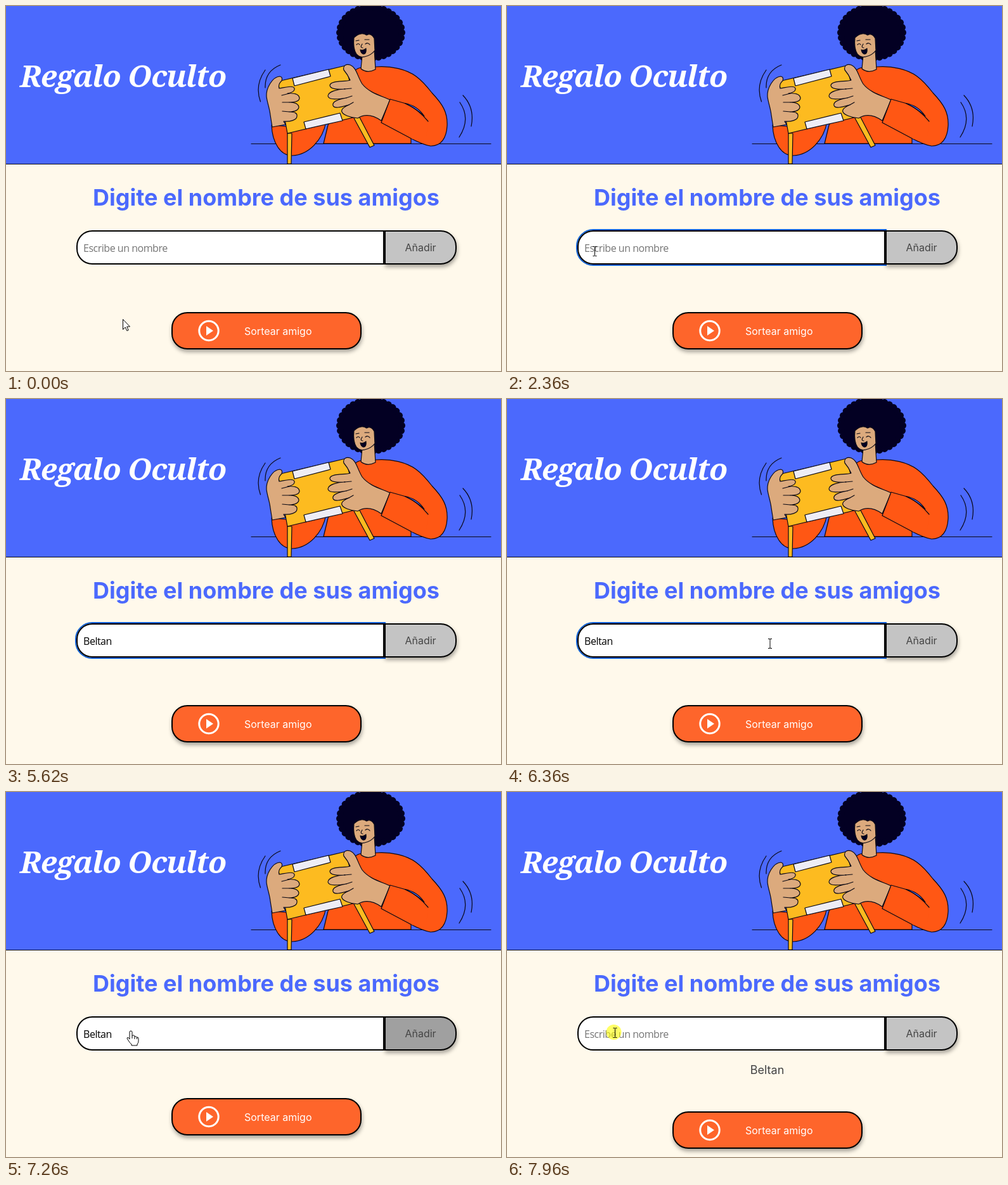
Recreate the animation shown at these times as an HTML page. Size 781 by 576 pixels, loop 8 s.

```html
<!DOCTYPE html>
<html lang="es">
<head>
<meta charset="utf-8">
<title>Sorteo</title>
<style>
  html, body { margin: 0; width: 100%; height: 100%; overflow: hidden; background: #fff9eb; }
  svg { display: block; }
  .title { font: italic 900 48px "Noto Serif", serif; letter-spacing: -.025em; fill: #fff; }
  .head { font: 700 36px Inter, sans-serif; fill: #4b69fd; }
  .ui { font: 16px Inter, sans-serif; fill: #444; }
  .item { font: 18px Inter, sans-serif; fill: #444; }
  .field { font: 16px "Open Sans", sans-serif; letter-spacing: -.03em; }
  .mid { text-anchor: middle; }
  .art { stroke: #0a0814; stroke-width: 1.2; stroke-linejoin: round; stroke-linecap: round; }
  .skin { fill: #dcaa7d; }
  .shirt { fill: #ff5714; }
  .box { fill: #fdbb20; }
  .label { fill: #eeedf5; }
  .line { fill: none; }
  .drop { filter: drop-shadow(1px 4px 3px rgba(0, 0, 0, .35)); }
  .edge { stroke: #000; stroke-width: 2; }
</style>
</head>
<body>
<svg width="781" height="576" viewBox="0 0 781 576">
  <rect width="781" height="249" fill="#4b69fd"/>
  <rect y="249" width="781" height="1" fill="#0a0a14"/>
  <text class="title" x="22" y="128">Regalo Oculto</text>

  <g class="art">
    <path class="line" d="M387 217.5H765"/>
    <path class="line" d="M409 101Q392 125 401.500 151M433 93Q408 103 409 129M716 152Q734 178 715 207M721 141Q740 161 734 190"/>

    <!-- torso and raised arm -->
    <path class="shirt" d="M501 217L508 188L548 104Q555 97 562 97L583 96C608 94 632 100 647 111C658 119 665 128 672 137C689 155 697 168 696 189C695 208 687 221 670 221Q658 219 639 209V217Z"/>
    <path class="shirt" d="M419 188C420 215 433 237 452 236C477 235 500 212 505 182L444 190Z"/>

    <!-- head -->
    <g fill="#030023" stroke="#030023">
      <ellipse cx="575.500" cy="42" rx="49" ry="40"/>
      <ellipse cx="575.500" cy="42" rx="49" ry="40" fill="none" stroke-width="11" pathLength="34" stroke-dasharray="0 1"/>
    </g>
    <path class="skin" d="M562 78L560 99Q570 107 583 100L581 68Z"/>
    <path class="skin" d="M549 50C548 59 549 70 553 76Q558 82 566 80Q576 78 582 70L581 51Q576 42 569 46Q560 40 549 50Z"/>
    <path class="line" d="M553 61Q556 58 558 61M567 60Q571 57 574 61M562 60Q558 66 563 66M552 55L557 54M566 53L573 53"/>
    <path fill="#030023" d="M559 69Q564 71 568 67Q569 75 564 76Q560 75 559 69Z"/>

    <!-- parcel -->
    <path class="box" d="M444 201H451L450 249H444Z"/>
    <path class="box" d="M549 177L557 174L581 220L574 223Z"/>
    <path class="box" d="M429 119L536 94L556 174L444 201Z"/>
    <path class="label" d="M452 114L509 100L512 111L455 126Z"/>
    <path class="label" d="M470 183L527 169L531 181L473 194Z"/>

    <!-- hands -->
    <path class="skin" d="M432 111C420 112 410 130 411 143C412 152 416 162 417 172L420 191L441 187L438 182C448 183 459 180 459 174C460 169 455 167 447 167C456 167 462 164 462 159C461 154 455 152 447 152C456 152 463 150 463 145C462 139 455 137 444 138C451 137 456 134 455 130C453 125 443 128 431 130Q429 123 435 118Q437 112 432 111Z"/>
    <path class="line" d="M447 138L435 141M447 152H436M447 167L436 166"/>
    <path class="skin" d="M533 101C531 94 537 91 543 93C553 97 554 110 562 123C573 137 590 141 606 148L592 181C582 174 568 169 555 177C543 176 532 172 530 167C528 163 534 159 541 156C530 159 518 163 516 157C514 150 527 147 537 145C525 147 509 149 508 142C508 135 524 131 535 131C522 132 511 131 511 125C513 117 535 120 543 117Q539 108 533 101Z"/>
    <path class="line" d="M534 131L545 130M537 145L546 142M541 156L548 152"/>

    <!-- forearm -->
    <path class="shirt" stroke="none" d="M606 147L631 154Q650 163 666 182L662 216L639 209L592 184Z"/>
    <path fill="#4b69fd" d="M629 153.500Q649 157 660 174Q648 162 629 153.500Z"/>
    <path class="line" d="M666 182Q650 163 631 154L606 147L592 184L639 209"/>
  </g>

  <text class="head mid" x="410.500" y="315">Digite el nombre de sus amigos</text>

  <path id="ring" fill="none" stroke="#0b5ed7" stroke-width="2" d="M598 353H136A26 26 0 0 0 110 379V383A26 26 0 0 0 136 409H598Z"/>
  <path class="edge" fill="#fff" d="M597 355H136A24 24 0 0 0 112 379V383A24 24 0 0 0 136 407H597Z"/>
  <g class="drop"><path id="add" class="edge" d="M598 355H686A24 24 0 0 1 710 379V383A24 24 0 0 1 686 407H598Z"/></g>
  <path d="M597 354V408" stroke="#000" stroke-width="4"/>
  <text class="ui mid" x="654" y="387">Añadir</text>
  <text id="field" class="field" x="122" y="388"></text>
  <rect id="caret" y="372" width="1" height="19"/>
  <text id="item" class="item mid" x="410.500" y="445">Beltan</text>

  <g id="draw">
    <rect class="edge drop" x="262" y="484" width="298" height="57" rx="24" fill="#fe652b"/>
    <circle cx="320" cy="512.500" r="15.200" fill="none" stroke="#fff" stroke-width="3"/>
    <path fill="#fff" d="M316 505L327 512.500L316 520Z"/>
    <text class="ui" x="376" y="519" style="fill:#fff">Sortear amigo</text>
  </g>

  <circle id="glow" r="12" fill="#ff0" fill-opacity=".6"/>
  <g id="pointer">
    <path id="arrow" fill="#fff" stroke="#000" d="M.5.5V16.500L4.200 13L6.800 18.500L9.200 17.500L6.700 12H11.500Z"/>
    <path id="beam" fill="none" stroke="#000" d="M-3-7.500H-1Q0-7.500 0-6.500V6.500Q0 7.500-1 7.500H-3M3-7.500H1Q0-7.500 0-6.500M0 6.500Q0 7.500 1 7.500H3"/>
    <g id="hand" stroke="#000" stroke-linejoin="round">
      <path fill="#fff" d="M-2 13V2Q-2 0 0 0Q2 0 2 2V8Q3 6.500 5 7Q6 7.500 6 9Q8 8 9.500 10Q12 9.500 12 12V16Q12 19 10 21V23H1V21Q-2 19-4 15L-6 12Q-6 10-4 10.500Z"/>
      <path fill="none" d="M2 8V12M6 9V13M9.500 10V13"/>
    </g>
  </g>
</svg>
<script>
const LOOP = 8000;
const NAME = "Beltan";
const $ = id => document.getElementById(id);

// time, shape, hotspot
const moves = [
  [0, "arrow", 184, 494], [70, "arrow", 155, 411], [460, "arrow", 155, 409],
  [800, "beam", 151, 402], [870, "beam", 145, 395], [930, "beam", 140, 389],
  [1000, "beam", 138.5, 387], [2970, ""],
  [5690, "beam", 161, 390], [5760, "beam", 180, 389], [5830, "beam", 208, 387],
  [5900, "beam", 236, 385], [5970, "beam", 252.5, 384],
  [6160, "beam", 270, 384], [6230, "beam", 325, 385], [6300, "beam", 415, 386],
  [6370, "beam", 505, 386], [6430, "beam", 570, 384], [6500, "hand", 622, 380],
  [6590, "hand", 651, 377], [6640, "hand", 657, 378], [6700, "hand", 660, 379],
  [7140, "hand", 560, 380], [7190, "hand", 350, 379], [7260, "hand", 197, 377],
  [7330, "hand", 182, 378], [7400, "hand", 174, 379], [7560, "beam", 171, 380],
  [7630, "beam", 170.5, 380]
];
const keys = [2970, 3560, 3960, 4550, 4750, 4900];
const carets = [[1420, 2360], [2970, 5620], [6840, 7140]];
const clicks = [[6840, 6970], [7960, LOOP]];
const ADDED = 7560;

const within = (t, spans) => spans.some(([a, b]) => t >= a && t < b);
const show = (id, on) => $(id).style.display = on ? "" : "none";

function render(t) {
  const added = t >= ADDED;
  const typed = added ? "" : NAME.slice(0, keys.filter(k => k <= t).length);
  const field = $("field");
  field.textContent = typed || "Escribe un nombre";
  field.style.fill = typed ? "#000" : "#757575";

  show("caret", within(t, carets));
  $("caret").setAttribute("x", typed ? Math.round(122 + field.getComputedTextLength()) : 123);
  show("ring", within(t, [[1420, 7140]]));
  $("add").style.fill = within(t, [[6500, ADDED]]) ? "#a0a0a0" : "#c4c4c4";
  show("item", added);
  $("draw").setAttribute("transform", `translate(0 ${added ? 21 : 0})`);

  const [, shape, x = 0, y = 0] = moves.findLast(m => m[0] <= t);
  for (const id of ["arrow", "beam", "hand"]) show(id, id === shape);
  $("pointer").setAttribute("transform", `translate(${x} ${y})`);
  show("glow", within(t, clicks));
  $("glow").setAttribute("transform", `translate(${x - 2} ${y - 1})`);
}

function tick() {
  render(performance.now() % LOOP);
  requestAnimationFrame(tick);
}
tick();
</script>
</body>
</html>
```
